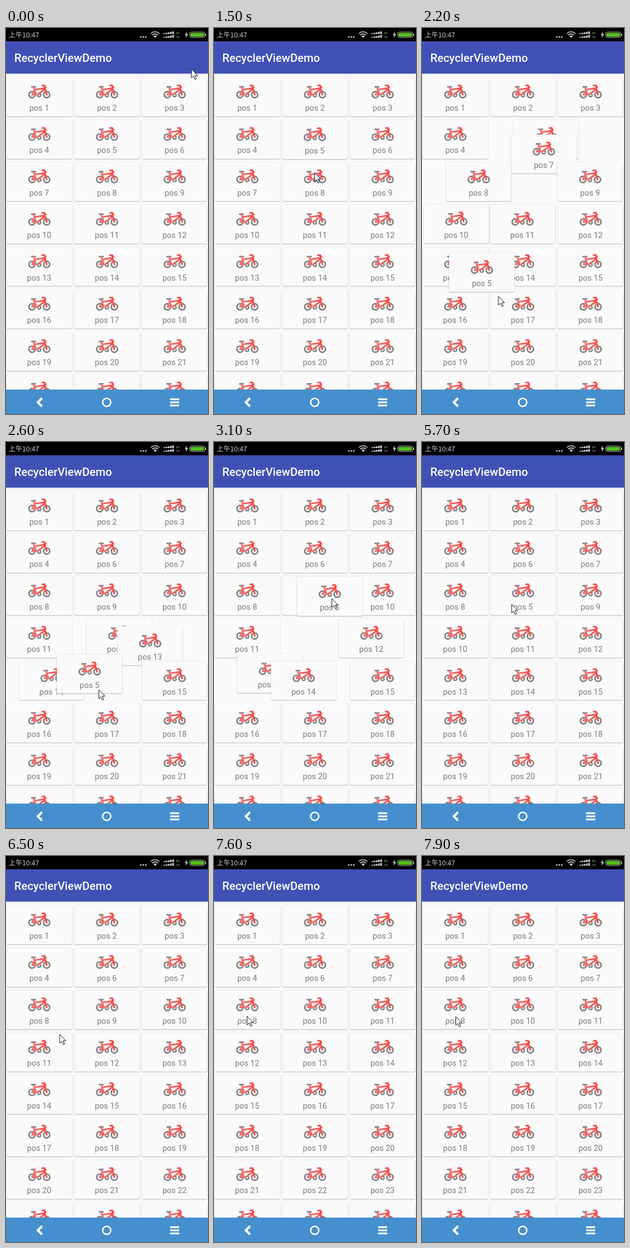
An HTML page that plays this animation: 365x695 px, repeating every 8 s.

```html
<!DOCTYPE html>
<html lang="en">
<head>
<meta charset="utf-8">
<title>RecyclerViewDemo</title>
<style>
  html, body { margin: 0; width: 100%; height: 100%; overflow: hidden; background: #fafafa; }
  #stage { position: relative; width: 365px; height: 695px; overflow: hidden; background: #fafafa; font-family: Roboto, sans-serif; }
  #list { position: absolute; inset: 0; z-index: 0; }
  .card {
    position: absolute; left: 0; top: 0; width: 118px; height: 70px; border-radius: 2px;
    background: #fafafa; color: #7c7c7c; font-size: 14.5px; text-align: center;
    box-shadow: 0 1px 1.5px rgba(0,0,0,.24), 0 0 2px rgba(90,50,50,.13);
  }
  .card.lifted { box-shadow: 0 1px 2px rgba(0,0,0,.25), 0 0 2px rgba(0,0,0,.12); }
  .card svg { position: absolute; left: 38px; top: 12px; }
  .card span { position: absolute; left: 0; width: 100%; top: 47px; line-height: 18px; }
  #status { position: absolute; left: 0; top: 0; width: 365px; height: 24px; background: #000; }
  #bar {
    position: absolute; left: 0; top: 24px; width: 365px; height: 58px; background: #3f51b5; color: #fff;
    font-size: 20.4px; font-weight: 500; line-height: 60px; text-indent: 15px; box-shadow: 0 1px 4px rgba(0,0,0,.2);
  }
  #nav { position: absolute; left: 0; top: 651px; width: 365px; height: 44px; background: #468fce; }
  #cursor { position: absolute; left: -1px; top: -1px; }
</style>
</head>
<body>
<div id="stage">
  <svg width="0" height="0" style="position:absolute">
    <linearGradient id="red" gradientUnits="userSpaceOnUse" x1="6" y1="0" x2="36" y2="0">
      <stop offset="0" stop-color="#f07575"/><stop offset=".5" stop-color="#f36060"/><stop offset="1" stop-color="#f8453f"/>
    </linearGradient>
    <symbol id="bike" viewBox="0 0 42 28">
      <g fill="none" stroke="#858585" stroke-width="2.9">
        <circle cx="8" cy="19" r="5.5"/><circle cx="34.5" cy="19" r="5.5"/>
        <circle cx="21" cy="20" r="2.8" stroke-width="2.4"/>
        <path d="M7.5 5H14" stroke-linecap="round"/>
      </g>
      <path d="M11 6L15.5 19H8L13 10L31 7.5M31 9.5L18.5 18.5M26.5 2.5H31V6.5L34.5 19M31 5.5H33"
        fill="none" stroke="url(#red)" stroke-width="3" stroke-linejoin="round" stroke-linecap="round"/>
    </symbol>
  </svg>
  <div id="list"></div>
  <div id="bar">RecyclerViewDemo</div>
  <div id="status">
    <svg width="365" height="24" fill="#cfcfcf">
      <text x="5" y="17" font-size="12.2" font-family="'Noto Sans CJK SC', 'Noto Sans CJK', sans-serif">上午10:47</text>
      <circle cx="243.5" cy="16" r="1.5"/><circle cx="248" cy="16" r="1.5"/><circle cx="252.5" cy="16" r="1.5"/>
      <path d="M261.5 10Q269.5 3.5 277.5 10M264.3 12.8Q269.5 8.6 274.7 12.8" fill="none" stroke="#cfcfcf" stroke-width="1.6"/>
      <path d="M266.5 14.5Q269.5 12.3 272.5 14.5L269.5 18Z"/>
      <g id="bars"></g>
      <g font-family="Roboto, sans-serif" font-size="6" fill="#a8a8a8">
        <text x="306.5" y="10.5">3G</text><text x="306.5" y="17.5">1X</text>
      </g>
      <path d="M327 6L323 12.5H325.6L324.6 18L329 11H326.2Z"/>
      <rect x="331.7" y="7.2" width="27.6" height="10" rx="4" fill="none" stroke="#b4b4b4"/>
      <rect x="333.2" y="8.7" width="24.6" height="7" rx="2.6" fill="#54bd24"/>
      <rect x="360" y="10" width="1.5" height="4.5" rx=".7"/>
    </svg>
  </div>
  <div id="nav">
    <svg width="365" height="44" fill="none" stroke="#fff">
      <path d="M65 15.5L57.5 23L65 30.5" stroke-width="4"/>
      <circle cx="182" cy="23" r="7.3" stroke-width="2.6"/>
      <path d="M296.5 17.3H313M296.5 23H313M296.5 28.7H313" stroke-width="3.2"/>
    </svg>
  </div>
  <svg id="cursor" width="14" height="22" viewBox="-1 -1 14 22">
    <path d="M0 0V16L3.8 12.6L6.3 18.6L8.8 17.5L6.3 11.6H11Z" fill="#fff" stroke="#111" stroke-width="1"/>
  </svg>
</div>
<script>
const LOOP = 8000, STEP = 100, MOVE = 250, COUNT = 27;
const $ = id => document.getElementById(id);

// The dragged card trails the pointer, held at a fixed grip point
const drag = { card: 4, lift: 1100, start: 1400, drop: 4950, lag: 100, grip: [63, 82] };
const swipes = [{ card: 4, start: 5750, end: 6170 }, { card: 8, start: 6850, end: 7220 }];

// List changes: [time, from index, to index]; no target means removal
const changes = [
  [2050, 4, 7], [2186, 7, 10], [2420, 10, 13], [2917, 13, 10], [3150, 10, 7],
  [6220, 7], [7270, 7]
];

// Turning points of the pointer: [time, x, y]
const pointer = [
  [0, 335, 74], [500, 164, 258], [700, 186, 248], [1400, 186, 248], [1900, 165, 310],
  [2100, 112, 487], [2200, 138, 483], [2400, 142, 483], [2850, 200, 400], [3000, 213, 325],
  [3100, 213, 282], [4000, 205, 299], [4100, 205, 299], [4200, 205, 328], [4800, 203, 356],
  [5700, 162, 292], [6100, 70, 322], [6500, 97, 321], [6850, 162, 292], [7150, 58, 287], [7900, 61, 289]
];

const clamp = p => Math.min(1, Math.max(0, p));
const ease = p => (1 - Math.cos(Math.PI * clamp(p))) / 2;
const mix = (a, b, p) => [a[0] + (b[0] - a[0]) * p, a[1] + (b[1] - a[1]) * p];
const slot = i => [1 + 122.3 * (i % 3), 89 + 76.4 * Math.floor(i / 3)];

function pointerAt(t) {
  let i = 0;
  while (i < pointer.length - 2 && pointer[i + 1][0] <= t) i++;
  const [t0, ...a] = pointer[i], [t1, ...b] = pointer[i + 1];
  return mix(a, b, clamp((t - t0) / (t1 - t0)));
}

const legs = Array.from({ length: COUNT }, (_, i) => [{ t: -MOVE, a: slot(i), b: slot(i) }]);

function place(i, t) {
  const leg = legs[i].filter(l => l.t <= t).pop();
  return mix(leg.a, leg.b, ease((t - leg.t) / MOVE));
}

const order = legs.map((_, i) => i);
for (const [t, from, to] of changes) {
  const before = order.slice();
  const [item] = order.splice(from, 1);
  if (to !== undefined) order.splice(to, 0, item);
  order.forEach((id, i) => {
    if (before[i] !== id) legs[id].push({ t, a: place(id, t), b: slot(i) });
  });
}

function dragged(t) {
  const [x, y] = pointerAt(Math.min(t, drag.drop) - drag.lag);
  const hand = [x - drag.grip[0], y - drag.grip[1]];
  return mix(hand, place(drag.card, t), ease((t - drag.drop) / MOVE));
}

function cardAt(i, t) {
  if (i === drag.card && t >= drag.start && t < drag.drop + MOVE) return dragged(t);
  const [x, y] = place(i, t);
  const swipe = swipes.find(s => s.card === i);
  const p = swipe ? clamp((t - swipe.start) / (swipe.end - swipe.start)) : 0;
  return [x - 260 * p * p, y];
}

const cards = legs.map((_, i) => {
  const el = document.createElement("div");
  el.className = "card";
  el.innerHTML = `<svg width="42" height="28"><use href="#bike"/></svg><span>pos ${i + 1}</span>`;
  $("list").append(el);
  return el;
});

// Two rows of signal bars
let bars = "";
for (let row = 0; row < 2; row++)
  for (let k = 0; k < 5; k++) {
    const h = 1.6 + k * 0.8;
    bars += `<rect x="${284.5 + k * 4}" y="${11 + row * 6.5 - h}" width="3" height="${h}"/>`;
  }
$("bars").innerHTML = bars;

const shift = (el, [x, y]) => { el.style.transform = `translate(${x}px,${y}px)`; };

function draw(t) {
  const lifted = t >= drag.lift && t < drag.drop + MOVE;
  cards.forEach((el, i) => {
    const swipe = swipes.find(s => s.card === i && t >= s.start);
    shift(el, cardAt(i, t));
    el.style.zIndex = swipe || (lifted && i === drag.card) ? COUNT : i;
    el.style.visibility = swipe && t >= swipe.end ? "hidden" : "visible";
  });
  cards[drag.card].classList.toggle("lifted", lifted);
  shift($("cursor"), pointerAt(t));
}

// The screen refreshes ten times a second
function tick() {
  draw(Math.floor((performance.now() + 30) / STEP) * STEP % LOOP);
  requestAnimationFrame(tick);
}
tick();
</script>
</body>
</html>
```
